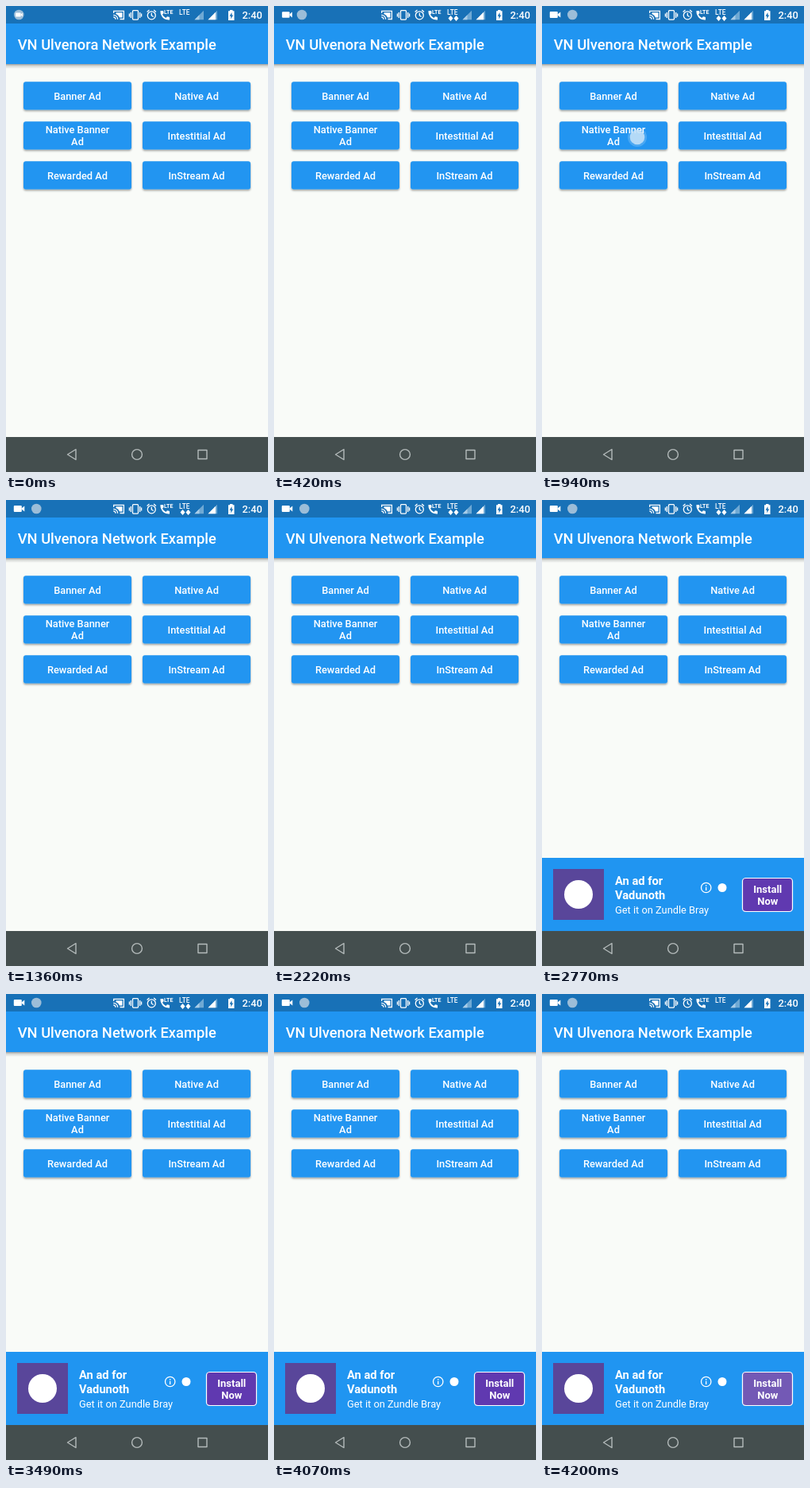
An HTML page for the animation above (4350 ms loop, 330 px wide and 586 px high).

```html
<!DOCTYPE html>
<html lang="en">
<head>
<meta charset="utf-8">
<title>Ad example</title>
<style>
html, body { margin: 0; width: 100%; height: 100%; overflow: hidden; background: #f9fbf8; }
svg { display: block; width: 100%; height: 100%; }
text { font-family: Roboto, "Noto Sans", sans-serif; font-size: 12.83px; fill: #fff; }
.medium { font-weight: 500; }
.bold { font-weight: 700; }
.mid { text-anchor: middle; }
.line { fill: none; stroke: #fff; stroke-width: 1.3; }
.white { fill: #fff; }
.nav { fill: none; stroke: #b4bbbb; stroke-width: 1.4; stroke-linejoin: round; }
</style>
</head>
<body>
<svg viewBox="0 0 330 586">
  <defs>
    <linearGradient id="shade" x2="0" y2="1">
      <stop offset="0" stop-color="#000" stop-opacity=".36"/>
      <stop offset=".4" stop-color="#000" stop-opacity=".14"/>
      <stop offset="1" stop-color="#000" stop-opacity="0"/>
    </linearGradient>
    <filter id="lift" x="-5%" y="-10%" width="110%" height="130%">
      <feDropShadow dx="0" dy="1.6" stdDeviation="1.1" flood-color="#000" flood-opacity=".38"/>
    </filter>
  </defs>

  <rect width="330" height="586" fill="#f9fbf8"/>
  <rect y="73" width="330" height="6" fill="url(#shade)"/>
  <rect y="22" width="330" height="51" fill="#2095f1"/>
  <rect width="330" height="22" fill="#1871b7"/>
  <text class="medium" x="14.7" y="54.5" style="font-size:18.33px">VN Ulvenora Network Example</text>

  <!-- status bar -->
  <circle id="ball" cy="11" r="6.3" fill="#9cbdd8"/>
  <g id="camera" class="white">
    <rect x="-6.5" y="-4" width="10" height="8" rx="1"/>
    <path d="M3.5 -.8L7 -3.6V3.6L3.5 .8Z"/>
  </g>
  <g class="line">
    <path d="M135.700 9V6.300H148.400V16.500H143.500"/>
    <path d="M135.200 11.300A5.500 5.500 0 0 1 140.700 16.800M135.200 13.900A2.900 2.900 0 0 1 138.100 16.800"/>
    <rect x="159.500" y="5.700" width="7" height="11.400" rx="1"/>
    <path d="M157.300 8V15M155.400 9.500V13.500M168.700 8V15M170.600 9.500V13.500"/>
    <circle cx="183.300" cy="11.800" r="5"/>
    <path d="M183.300 8.800V12L185.700 13.500M177.600 7.500L180.500 5M189 7.500L186.100 5"/>
  </g>
  <path class="white" d="M138.500 8.300H146.500V14.500H143Q141.800 11 138.500 10Z"/>
  <path class="white" d="M194.500 6H197.500Q198.200 6 198.300 7L198.600 9L197 10.700Q198.700 13.700 201.300 15L203 13.300L205.300 13.800Q206 14 206 14.700V17.500Q198 18 195.300 11Q194.300 8.500 194.500 6Z"/>
  <text class="bold" x="199" y="10" style="font-size:7px">LTE</text>
  <text class="medium" x="218" y="11" style="font-size:8.300px">LTE</text>
  <path id="data" class="white" d="M222.500 12L225.500 15.500L222.500 19L219.500 15.500ZM229.500 12L232.500 15.500L229.500 19L226.500 15.500Z"/>
  <path fill="#6fa9d4" d="M237.500 17.300L249 5.800V17.300Z"/>
  <path fill="#a9cde8" d="M237.500 17.300L243.500 11.300V17.300Z"/>
  <path fill="#6fa9d4" d="M254.500 17.300L266 5.800V17.300Z"/>
  <path class="white" d="M254.500 17.300L264 7.800V17.300Z"/>
  <path class="white" d="M282 5H285.500V6.300H287.500V18H280V6.300H282Z"/>
  <path fill="#1871b7" d="M284.500 8L281.500 12.700H283.300V16.300L286.200 11.500H284.500Z"/>
  <text class="medium" x="297.500" y="16">2:40</text>

  <g id="buttons"></g>

  <g id="touch">
    <circle cx="120" cy="165" r="12" fill="#fff" opacity=".18"/>
    <circle cx="120" cy="165" r="9.300" fill="#c3e0f7" opacity=".88"/>
  </g>

  <!-- banner -->
  <g id="banner">
    <rect y="450" width="330" height="92" fill="#2095f1"/>
    <rect id="tile" x="14" y="464" width="64" height="64"/>
    <circle class="white" cx="46" cy="496" r="18"/>
    <text class="bold" x="92" y="484" style="font-size:14.67px">An ad for</text>
    <text class="bold" x="92" y="501.500" style="font-size:14.67px">Vadunoth</text>
    <text x="92" y="520">Get it on Zundle Bray</text>
    <circle class="line" cx="206.700" cy="487.500" r="6.200"/>
    <path class="line" d="M206.700 484V485.500M206.700 486.800V491"/>
    <circle class="white" cx="227" cy="487.500" r="5.500"/>
    <rect id="install" x="252.500" y="475.500" width="63" height="42" rx="4" stroke="#fff" stroke-width="1.200"/>
    <text class="bold mid" x="284.300" y="493.800" style="font-size:13px">Install</text>
    <text class="bold mid" x="284.300" y="509.300" style="font-size:13px">Now</text>
  </g>

  <!-- navigation -->
  <rect y="542" width="330" height="44" fill="#444e4e"/>
  <g class="nav">
    <path d="M77.500 564L88 557.500V570.500Z"/>
    <circle cx="165" cy="564" r="6.400"/>
    <rect x="242" y="558.500" width="11" height="11"/>
  </g>
</svg>
<script>
const LOOP = 4350;
const $ = id => document.getElementById(id);
const between = (t, a, b) => t >= a && t < b;
const show = (id, on) => $(id).setAttribute("visibility", on ? "visible" : "hidden");

const labels = [
  ["Banner Ad"], ["Native Ad"],
  ["Native Banner", "Ad"], ["Intestitial Ad"],
  ["Rewarded Ad"], ["InStream Ad"]
];
$("buttons").innerHTML = labels.map((lines, i) => {
  const x = 22 + 150 * (i % 2);
  const y = 95.3 + 50 * Math.floor(i / 2);
  const first = y + 22.3 - 7.4 * (lines.length - 1);
  const text = lines.map((s, n) =>
    `<text class="medium mid" x="${x + 68}" y="${first + 14.8 * n}">${s}</text>`).join("");
  return `<rect x="${x}" y="${y}" width="136" height="35.2" rx="3" fill="#2095f1" filter="url(#lift)"/>${text}`;
}).join("");

function draw(t) {
  // the notification ball slides out from behind the camera
  const p = Math.min(1, Math.max(0, (t - 110) / 410));
  const slide = p * p * (3 - 2 * p);
  $("ball").setAttribute("cx", 16.3 + 22 * slide);
  $("camera").setAttribute("transform", `translate(16.3 11) scale(${0.65 + 0.35 * slide})`);
  show("data", between(t, 210, 4070));
  show("touch", between(t, 940, 1040));
  show("banner", t >= 2540);
  const grey = t < 2670;
  $("tile").setAttribute("fill", grey ? "#687c89" : "#59469a");
  $("install").setAttribute("fill", grey ? "#788f9f" : t < 4200 ? "#6039b0" : "#7359b5");
}

const start = performance.now();
function tick() {
  draw((performance.now() - start) % LOOP);
  requestAnimationFrame(tick);
}
tick();
</script>
</body>
</html>
```
